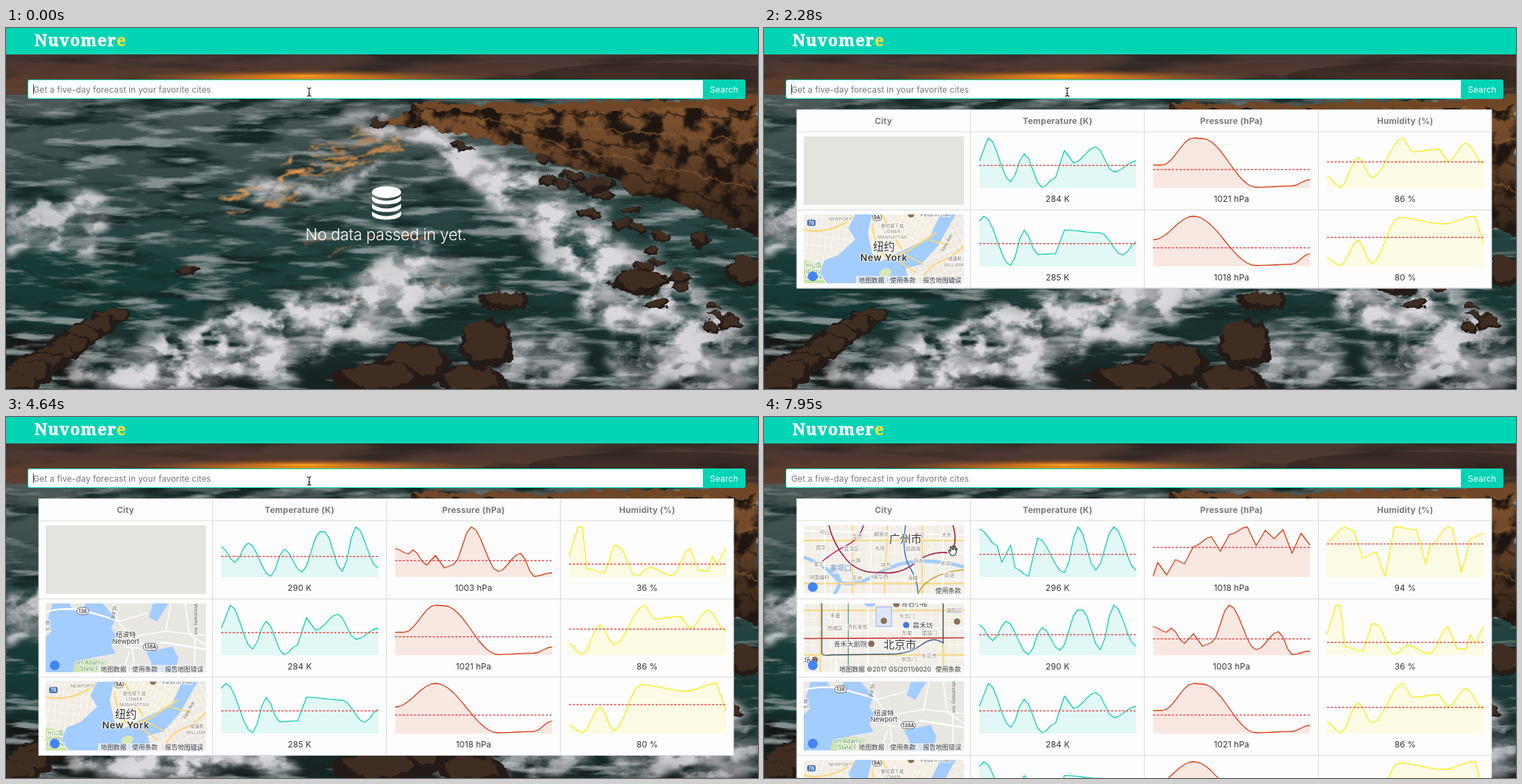
These frames come from a looping animation (1079x519 px, 8000 ms). An HTML page:

```html
<!DOCTYPE html>
<html lang="en">
<head>
<meta charset="utf-8">
<title>Five-day forecast</title>
<style>
  html, body { margin: 0; width: 100%; height: 100%; overflow: hidden; background: #263c3c; }
  svg { position: absolute; left: 0; top: 0; width: 1079px; height: 519px; }
  #photo { will-change: transform; }
  text { font-family: Inter, "Noto Sans CJK SC", "Noto Sans CJK", sans-serif; white-space: pre; }
  .mid { text-anchor: middle; }
</style>
</head>
<body>
<svg id="photo" viewBox="0 0 1079 519"></svg>
<svg id="ui" viewBox="0 0 1079 519"></svg>
<script>
const LOOP = 8000, ROW = 112.5, TOP = 149, TEAL = '#00d4b5';
const $ = id => document.getElementById(id);

let seed = 11;
const rnd = (a = 0, b = 1) => {
  seed = (seed * 16807) % 2147483647;
  return a + (b - a) * seed / 2147483647;
};
const mix = (a, b, p) => a + (b - a) * p;
const many = (n, fn) => Array.from({ length: n }, (_, i) => fn(i, i / (n - 1))).join('');
const poly = (pts, fill, extra = '') => `<polygon points="${pts}" fill="${fill}" ${extra}/>`;
const blob = (x, y, rx, ry, fill, o = 1, rot = 0) =>
  `<ellipse rx="${rx}" ry="${ry}" fill="${fill}" opacity="${o}" transform="translate(${x} ${y}) rotate(${rot})"/>`;
const line = (d, stroke, w = 1, extra = '') =>
  `<path d="${d}" fill="none" stroke="${stroke}" stroke-width="${w}" ${extra}/>`;
const label = (x, y, s, size, fill, extra = '') =>
  `<text x="${x}" y="${y}" font-size="${size}" fill="${fill}" class="mid" ${extra}>${s}</text>`;
const group = (filter, body) => `<g filter="url(#${filter})">${body}</g>`;

/* ---------- seaside backdrop ---------- */
const grad = (id, colors) => `<linearGradient id="${id}" x2="0" y2="1">${
  colors.map((c, i) => `<stop offset="${i / (colors.length - 1)}" stop-color="${c}"/>`).join('')}</linearGradient>`;
const area = 'x="0" y="0" width="1079" height="519" filterUnits="userSpaceOnUse" color-interpolation-filters="sRGB"';
const cloud = (freq, s) => `<feTurbulence type="fractalNoise" baseFrequency="${freq}" numOctaves="5" seed="${s}" result="n"/>`;
const rough = (id, freq, scale, blur) => `<filter id="${id}" ${area}>${cloud(freq, 3)}
  <feDisplacementMap in="SourceGraphic" in2="n" scale="${scale}" xChannelSelector="R" yChannelSelector="G"/>
  <feGaussianBlur stdDeviation="${blur}"/></filter>`;
const grain = (id, freq, s, gain, cut) => `<filter id="${id}" ${area}>${cloud(freq, s)}
  <feColorMatrix values="0 0 0 0 1  0 0 0 0 1  0 0 0 0 1  ${gain} 0 0 0 ${-cut}" result="m"/>
  <feComposite in="SourceGraphic" in2="m" operator="in"/></filter>`;

// irregular boulder with a lighter top
function rock(x, y, rx, ry) {
  const ring = (k, dy) => many(9, i => {
    const a = i / 9 * 2 * Math.PI, r = k * rnd(.85, 1.1);
    return `${x + rx * r * Math.cos(a)},${y + dy + ry * r * Math.sin(a)} `;
  });
  return poly(ring(1, 0), '#241b17') + poly(ring(.75, -ry * .2), '#3f2d22');
}

function photo() {
  const defs = grad('sky', ['#4a3833', '#4e3830', '#5f3e2c', '#5a4034'])
    + grad('sea', ['#4d5958', '#3c4e4c', '#2a4543', '#1d403c', '#193230', '#181f1f'])
    + grad('cliff', ['#86582f', '#6d472a', '#4a3220', '#2b2019'])
    + `<radialGradient id="glow"><stop stop-color="#ffb01c"/><stop offset=".4" stop-color="#d87a20" stop-opacity=".75"/><stop offset="1" stop-color="#a55a24" stop-opacity="0"/></radialGradient>`
    + rough('soft', '.02 .04', 30, 5) + rough('mist', '.014 .026', 70, 5) + rough('edge', '.045', 20, .7) + rough('streak', '.02 .08', 26, .8)
    + grain('clouds', '.006 .04', 4, 3, 1.3) + grain('lights', '.012 .07', 6, 4.5, 2.3) + grain('darks', '.01 .05', 9, 4, 1.9)
    + grain('foam', '.014 .03', 8, 2.6, .75) + grain('froth', '.025 .035', 2, 5, 2.1) + grain('cracks', '.035 .03', 5, 5, 2.2);

  const sky = '<rect y="38" width="1079" height="60" fill="url(#sky)"/>'
    + group('clouds', '<rect y="38" width="1079" height="56" fill="#2f2724"/>')
    + blob(430, 72, 260, 12, 'url(#glow)') + blob(430, 69, 130, 5, 'url(#glow)') + blob(950, 70, 200, 20, '#2a211f', .5);

  const water = fill => `<rect y="96" width="1079" height="423" fill="${fill}"/>`;
  const sea = water('url(#sea)')
    + group('soft', blob(100, 380, 190, 60, '#153a35', .7) + blob(700, 340, 70, 60, '#17332f', .8) + blob(30, 480, 90, 45, '#161614', .9))
    + group('darks', water('#152826')) + group('lights', water('#84908f'))
    + group('streak', many(60, (i, p) => blob(560 - 210 * p + rnd(-50, 40), 150 + 105 * p + rnd(-12, 10), rnd(8, 28), rnd(.8, 2),
      i % 3 ? '#c98650' : '#f0a457', .8, -12)) + many(12, () => blob(rnd(430, 620), rnd(300, 400), rnd(8, 25), 1.5, '#b8713f', .6, -15)));

  // breakers widen as they come closer
  const spray = fill => many(26, (i, p) => blob(600 - 400 * p + rnd(-25, 25), 370 + 130 * p + rnd(-20, 20), 70 + 55 * p, 28 + 16 * p, fill, .5, -14))
    + many(34, (i, p) => blob(520 + 480 * p + rnd(-45, 45) * p, 143 + 80 * p + 270 * p * p, 36 + 85 * p, 7 + 55 * p, fill, .42, 38))
    + blob(760, 480, 80, 45, fill, .6) + blob(50, 285, 100, 40, fill, .8, -6) + blob(440, 222, 95, 20, fill, .7, -6);
  const foam = group('foam', group('mist', spray('#a9a9ae'))) + group('froth', group('mist', spray('#dcdade')));

  const wall = '520,137 578,124 583,108 760,110 1079,99 1079,305 960,248 905,240 870,215 820,204 740,172 640,150';
  const cliff = group('edge', poly(wall, 'url(#cliff)'))
    + group('cracks', group('edge', poly(wall, '#1f1611') ))
    + group('edge', many(5, i => line(`M${600 + i * 40} ${118 + i * 9}Q820 ${128 + i * 17} 1079 ${128 + i * 34}`, i % 2 ? '#8a5c34' : '#20160f', 3, 'opacity=".55"'))
      + poly('583,108 760,110 1079,99 1079,113 840,119 600,116', '#6f4727'));

  const rocks = group('edge', many(22, (i, p) => rock(780 + 270 * p + rnd(-45, 45), 200 + 250 * p + rnd(-25, 25), 9 + 14 * rnd(), 4 + 6 * rnd()))
    + rock(535, 137, 17, 5) + rock(655, 170, 22, 6) + rock(845, 225, 36, 13) + rock(910, 366, 48, 18) + rock(995, 304, 13, 12)
    + rock(1065, 350, 34, 25) + rock(260, 348, 16, 7) + rock(715, 392, 42, 15)
    + rock(690, 456, 46, 38) + rock(585, 483, 55, 34) + rock(530, 505, 70, 28) + rock(670, 508, 55, 24)
    + many(8, (i, p) => rock(150 - 140 * p, 415 + 95 * p, 28 + 16 * p, 12 + 8 * p)));

  return `<defs>${defs}</defs>${sky}${sea}${foam}${cliff}${rocks}`;
}

/* ---------- maps, 230 x 99 each ---------- */
const streets = (id, base, rot, step) => `<pattern id="${id}" width="${step}" height="${step * 1.5}" patternUnits="userSpaceOnUse" patternTransform="rotate(${rot})">
  <rect width="${step}" height="${step * 1.5}" fill="${base}"/><path d="M0 0H${step}M0 0V${step * 1.5}" stroke="#fff" stroke-width="1.3"/></pattern>`;
const shield = (x, y, s, blue) => {
  const w = 6 + 3.6 * s.length;
  return `<rect x="${x - w / 2}" y="${y - 5}" width="${w}" height="10" rx="${blue ? 3 : 5}" fill="${blue ? '#4470b8' : '#fff'}" stroke="${blue ? '#fff' : '#555'}" stroke-width=".9"/>`
    + label(x, y + 2.6, s, 7, blue ? '#fff' : '#333', 'font-weight="600"');
};
const halo = 'stroke="#fff" stroke-width="2" paint-order="stroke" stroke-linejoin="round"';
const BROWN = '#8b7d6b', GREY = '#666';
const ground = fill => `<rect width="230" height="99" fill="${fill}"/>`;
const stack = (x, y, step, list, fill, size) => list.split(' ').map((s, i) => label(x, y + i * step, s, size, fill, halo)).join('');
// district names on a loose grid
const districts = (list, cols) => list.split(' ').map((s, i) =>
  label(26 + (i % cols) * 180 / (cols - 1) + rnd(-7, 7), 16 + Math.floor(i / cols) * 20 + rnd(-4, 4), s, 7.3, BROWN, halo)).join('');
const pin = (x, y, fill = '#8a6e5b') => blob(x, y, 4.6, 4.6, fill);

const maps = {
  newYork: () => ground('#a3ccff')
    + poly('0,0 74,0 64,20 74,36 50,58 30,66 22,84 34,99 0,99', 'url(#stA)')
    + poly('0,66 22,70 16,80 32,99 0,99', '#cbe6a3')
    + poly('98,0 92,26 98,56 110,68 142,52 180,34 196,0', 'url(#stB)')
    + poly('218,0 192,46 168,72 146,78 152,99 230,99 230,0', 'url(#stC)')
    + blob(117, 84, 9, 6, '#d5e8b4', 1, -20)
    + line('M0 22Q36 30 72 4M98 14Q104 54 122 64L150 52 190 26M168 99Q176 76 196 68T230 44M112 0L140 50', '#f9d978', 2.2)
    + line('M128 62L162 84M140 55L172 72M176 36L208 44', '#f9d978', 1.8)
    + stack(127, 19, 8.2, '曼哈顿下城 LOWER MANHATTAN', BROWN, 6.6) + stack(52, 8.5, 0, 'NEWPORT', BROWN, 6.6)
    + stack(217, 66, 9, '威廉斯 WILLIAMS', BROWN, 6.6) + stack(14, 76, 8.5, '州公園 iberty te&#160;Park', '#5f9a4c', 7.5)
    + label(189, 3, 'Pelbrin Hall', 8, GREY, halo) + pin(154, 0)
    + label(207, 42, 'Fenn Ave', 6, GREY, 'transform="rotate(-62 207 42)"')
    + shield(11, 12, '78', 1) + shield(105, 4, '9A') + shield(213, 97, '278', 1)
    + label(115, 52, '纽约', 15.5, '#333', halo)
    + label(115, 67, 'New York', 13.5, '#333', halo + ' font-weight="600" letter-spacing=".7"'),

  newport: () => ground('#a3ccff')
    + poly('0,0 10,0 2,26 8,40 0,48', '#e9e7e2') + poly('34,0 58,0 52,11 38,8', '#e9e7e2')
    + poly('82,0 100,22 94,36 102,48 94,60 100,72 66,78 38,99 146,99 152,86 144,70 182,62 190,78 186,99 230,99 230,0 176,0 160,26 148,20 154,0', '#e9e7e2')
    + poly('42,84 62,79 88,82 84,99 38,99', '#cde4ae')
    + line('M96 0L104 26 122 48 128 99M104 26L146 14M122 48L172 40 230 46M112 62L150 66M200 0L206 44 230 60M172 40L180 0M214 0V99M110 99L120 70', '#fff', 1.6)
    + line('M0 12Q30 4 60 12T106 26M122 48Q138 66 168 56L230 66', '#fff', 2.4)
    + shield(53, 11, '138') + shield(150, 62.5, '138A')
    + label(100, 14, '3rd St', 7, GREY, 'transform="rotate(-80 100 14)"')
    + label(213, 22, 'Meadowby Ave', 6.4, GREY, 'transform="rotate(90 213 22)"')
    + stack(3, 30, 8.5, '敦 wn', GREY, 7) + stack(63, 88, 9, 'ort&#160;Adams State&#160;P', '#4f8f45', 8.4)
    + stack(115, 48, 9.5, '纽波特 Newport', '#333', 9.6),

  beijing: () => ground('url(#stD)')
    + line('M24 0V99M200 0V99M0 10H230M0 74H230', '#f8d98a', 2.6) + line('M0 36H230M92 0V99M150 0V99M46 0V99', '#fff', 2)
    + '<rect x="104" y="5" width="22" height="28" fill="#dfe5fb" stroke="#8fb0ee"/>' + blob(95, 1, 8, 4, '#a3ccff')
    + line('M0 50.5L230 49.5', '#c8342f', 1.6) + line('M64 0V99', '#3f8c8c', 1.2)
    + line('M26 0V72Q28 76 40 74L120 73Q150 74 168 60T200 57V0', '#35588f', 1.4)
    + stack(45, 20, 18, '丰盛 西城区', BROWN, 7.4) + stack(77, 36, 0, '西长安街', BROWN, 7.4) + stack(148, 21, 24, '东华门 东单', BROWN, 7.4)
    + stack(216, 13, 0, '朝阳区', BROWN, 7.4) + stack(180, 45, 33, '建国门 东花市', BROWN, 7.4) + stack(151, 83, 0, '崇文门', BROWN, 7.4)
    + label(67, 61.5, '青禾大剧院', 9.6, '#444', halo) + label(171, 34.5, '晨禾坊', 9.6, '#444', halo)
    + label(159, 4, '青石小楼', 9.6, '#444', halo) + label(5, 85, '场', 9.6, '#444', halo)
    + pin(97, 58) + pin(115, 25) + pin(147, 31, '#4b78d8') + pin(133, 1) + pin(16, 81) + pin(220, 26)
    + label(138, 65, '北京市', 15.6, '#333', halo),

  guangzhou: () => ground('url(#stD)')
    + line('M0 46Q30 56 46 76T110 68T230 60M44 99Q58 80 46 70', '#a3ccff', 5)
    + line('M0 22H230M70 0V99M170 0V99M120 0L116 99M0 84H230', '#f8d98a', 2.3) + line('M0 8L230 14M30 0V99M200 0V99M96 0V99', '#fff', 1.8)
    + line('M22 56Q40 40 60 30T86 0', '#bd2f7c', 1.7) + line('M36 0Q42 26 60 48T110 68Q138 72 160 54T210 40Q222 26 214 0', '#a32f56', 1.8)
    + line('M146 0Q140 40 152 60T164 99', '#4d6fd0', 1.6) + line('M164 99Q176 70 230 64', '#c9a42c', 1.6)
    + districts('中山 华贵 解放北 建设 大东 昌华 荔湾区 光塔 德政南 农林 宝华 光荫 诗书 跃龙 赤岗 冲围塘村 花地 南华西 海幢 前进', 5)
    + label(53, 65, '塞坝口', 10.5, '#5f92cf') + label(146, 25.5, '广州市', 15.6, '#333', halo)
};

const terms = (x, s) => `<text x="${x}" y="97.6" font-size="9.2" fill="#444">${s}</text>`;
const strip = x => `<rect x="${x}" y="88.5" width="${230 - x}" height="10.5" fill="#f5f5f5" opacity=".75"/>`;
const footers = {
  full: strip(75) + terms(79, '地图数据') + terms(124, '使用条款') + terms(171, '报告地图错误') + line('M120 90V98M167 90V98', '#bbb', .7),
  dated: strip(48) + terms(51, '地图数据 ©2017 GS(2011)6020') + terms(189, '使用条款'),
  short: strip(185) + terms(189, '使用条款')
};

/* ---------- forecasts: turning points as step, depth pairs ---------- */
const cities = [
  { map: 'newYork', foot: 'full', row: 230, tiles: 230, badge: 470, terms: 470, text: ['285 K', '1018 hPa', '80 %'], turns: [
    [0, 7, 1, 0, 7, 71, 10, 20, 13, 55, 17, 54, 19, 20, 27, 24, 32, 56, 35, 37],
    [0, 34, 9, 0, 23, 71, 31, 69, 35, 54],
    [0, 60, 3, 71, 7, 34, 10, 68, 16, 2, 26, 11, 33, 0, 35, 39]] },
  { map: 'newport', foot: 'full', row: 2170, tiles: 2670, badge: 2820, terms: 2820, text: ['284 K', '1021 hPa', '86 %'], turns: [
    [0, 33, 2, 0, 7, 63, 10, 23, 14, 71, 17, 57, 19, 18, 21, 36, 26, 13, 30, 49, 35, 33],
    [0, 39, 2, 39, 9, 0, 11, 1, 23, 71, 31, 69, 35, 60],
    [0, 55, 3, 71, 7, 28, 10, 57, 17, 0, 19, 20, 25, 16, 27, 34, 31, 7, 35, 37]] },
  { map: 'beijing', foot: 'dated', row: 4640, tiles: 5780, badge: 6200, terms: 6200, text: ['290 K', '1003 hPa', '36 %'], turns: [
    [0, 28, 3, 51, 6, 23, 11, 71, 14, 32, 18, 65, 22, 7, 23, 7, 27, 64, 30, 0, 35, 59],
    [0, 31, 3, 39, 4, 33, 7, 55, 9, 41, 11, 59, 13, 54, 17, 0, 23, 64, 28, 38, 31, 71, 35, 66],
    [0, 42, 2, 0, 3, 1, 4, 60, 8, 66, 10, 27, 11, 27, 15, 71, 18, 58, 23, 70, 27, 31, 29, 62, 31, 64, 32, 42, 33, 55, 35, 30]] },
  { map: 'guangzhou', foot: 'short', row: 7050, tiles: 7170, badge: 7170, terms: 7340, text: ['296 K', '1018 hPa', '94 %'], turns: [
    [0, 3, 4, 27, 5, 51, 7, 26, 8, 59, 11, 71, 13, 16, 19, 66, 22, 0, 26, 62, 30, 0, 35, 62],
    [0, 71, 1, 51, 3, 69, 5, 47, 7, 53, 9, 28, 13, 14, 15, 35, 17, 11, 21, 0, 23, 27, 25, 5, 27, 17, 29, 4, 31, 38, 33, 9, 35, 26],
    [0, 21, 4, 0, 6, 6, 8, 45, 11, 36, 13, 71, 15, 0, 20, 4, 22, 53, 23, 27, 27, 0, 28, 2, 30, 65, 32, 17, 35, 9]] }
];

function curve(turns) {
  return Array.from({ length: 36 }, (_, i) => {
    let k = 0;
    while (turns[k + 2] < i) k += 2;
    const [a, from, b, to] = turns.slice(k, k + 4);
    return mix(from, to, (1 - Math.cos(Math.PI * (i - a) / (b - a))) / 2);
  });
}

const COLS = [171.5, 421.3, 670.8, 920], INK = ['#0fcdb2', '#d9360b', '#ffe812'];
function chart(turns, k) {
  const x = 309 + k * 249.4, ys = curve(turns), color = INK[k];
  const mean = ys.reduce((a, b) => a + b) / ys.length;
  const pts = ys.map((y, i) => `${(x + i * 225 / 35).toFixed(1)} ${(9 + y).toFixed(1)}`).join('L');
  return `<path d="M${x} 81L${pts}L${x + 225} 81Z" fill="${color}" opacity=".11"/>`
    + line('M' + pts, color, 1.3, 'stroke-linejoin="round"')
    + line(`M${x} ${Math.round(mean + 12) + .5}h225`, '#f23a3a', 1.3, 'stroke-dasharray="3 2.4"');
}
const cityRow = (c, i) => `<g id="row${i}">
  <rect x="47" width="997" height="${ROW}" fill="#fdfdfd"/>
  ${line(`M47 ${ROW}H1044M296.5 0V${ROW}M546 0V${ROW}M795.5 0V${ROW}`, '#d9d9d9')}
  <g transform="translate(57 6.5)" clip-path="url(#mapClip)">${ground('#e5e3df')}
    <g id="tiles${i}">${maps[c.map]()}</g><g id="terms${i}">${footers[c.foot]}</g>
    <circle id="badge${i}" cx="13" cy="89" r="7" fill="#4285f4"/></g>
  ${c.turns.map(chart).join('')}
  ${c.text.map((s, k) => label(COLS[k + 1], 101, s, 12.1, '#363636', 'letter-spacing=".09"')).join('')}</g>`;

const disk = y => `<path d="M525 ${y}Q546 ${y + 13} 567 ${y}V${y + 4}C567 ${y + 14} 525 ${y + 14} 525 ${y + 4}Z" fill="#fff"/>`;

$('photo').innerHTML = photo();
$('ui').innerHTML = `<defs>${streets('stA', '#f1ede4', 8, 9)}${streets('stB', '#f3eee0', 28, 7)}${streets('stC', '#eeeae2', -24, 8)}${streets('stD', '#f2efe7', 0, 13)}
  <clipPath id="mapClip"><rect width="230" height="99"/></clipPath></defs>
  <rect width="1079" height="38" fill="${TEAL}"/>
  <text x="41" y="26" font-size="23" fill="#fff" stroke="#fff" stroke-width=".6" style="font-family:'Noto Serif',serif;font-weight:700;letter-spacing:1.2px">Nuvomer<tspan fill="#f6e13d" stroke="#f6e13d">e</tspan></text>
  <g id="empty"><ellipse cx="546" cy="236" rx="21" ry="8.5" fill="#fff"/>${disk(242)}${disk(253)}${disk(264)}
    ${label(545, 305, 'No data passed in yet.', 23, '#fff', 'font-weight="300" letter-spacing="-.35"')}</g>
  <g id="table">${cities.map(cityRow).join('')}
    <rect x="47" y="117" width="997" height="32" fill="#fdfdfd"/>
    ${line('M47 149H1044M296.5 117V149M546 117V149M795.5 117V149', '#d9d9d9')}
    ${['City', 'Temperature (K)', 'Pressure (hPa)', 'Humidity (%)'].map((s, k) => label(COLS[k], 138, s, 12.1, '#7a7a7a', 'font-weight="700" letter-spacing=".22"')).join('')}
    <rect id="frame" x="47" y="117.5" width="997" fill="none" stroke="#d9d9d9"/></g>
  <rect x="31" y="74" width="1030" height="28" rx="3" fill="${TEAL}"/>
  <path d="M1000 75H34Q32 75 32 77V99Q32 101 34 101H1000Z" fill="#fff"/>
  ${label(1030.3, 92.6, 'Search', 12.1, '#fff', 'letter-spacing=".09"')}
  <text id="field" x="39" y="92.6" font-size="12.1" letter-spacing=".09"></text>
  <rect id="caret" y="81" width="1" height="14" fill="#333"/>
  <g id="beam">${line('M-3 -6Q0 -6 0 -4Q0 -6 3 -6M0 -4V5M-3 6Q0 6 0 4Q0 6 3 6M-1.5 2H1.5', '#111', 1.1)}</g>
  <path id="arrow" d="M0 0V13L3 10L5 15L7 14L5 9.5H9Z" fill="#111" stroke="#fff" stroke-width=".9"/>
  <path id="hand" d="M-3 7L-6 1Q-6 -1 -4 0L-3 1.5L-4 -5Q-3 -7 -2 -5L-1 -1V-6Q0 -8 1 -6V-1L2.5 -6Q4 -7 4 -5L3.5 0L5 -3Q6.5 -4 6 -2L4.5 4L3 7Z" fill="#fff" stroke="#111"/>`;

/* ---------- timeline ---------- */
const KEY = 117;
const burst = (start, n) => Array.from({ length: n }, (_, i) => start + i * KEY);
const typing = [
  { word: 'Newport', keys: [...burst(680, 3), 1400, ...burst(1630, 2), 1930], end: 2050 },
  { word: 'Beijing', keys: burst(3590, 7), end: 4530 },
  { word: 'Guangzhou', keys: [...burst(5660, 4), ...burst(6200, 2), ...burst(6460, 3)], end: 6930 }
];
const caretOff = [[3440, 3590], [5270, 5660], [7720, LOOP]];
const pointer = [[0, 435, 92], [7170, 400, 112], [7340, 300, 152], [7460, 205, 198], [7580, 168, 216], [7720, 215, 214], [7840, 255, 205], [7950, 271, 192]];
const show = (id, on) => $(id).setAttribute('visibility', on ? 'inherit' : 'hidden');

function render(t) {
  const active = typing.find(w => t >= w.keys[0] && t < w.end);
  const typed = active ? active.word.slice(0, active.keys.filter(k => k <= t).length) : '';
  const field = $('field');
  field.textContent = typed || 'Get a five-day forecast in your favorite cites';
  field.setAttribute('fill', typed ? '#363636' : '#777');
  $('caret').setAttribute('x', 39 + (typed ? field.getComputedTextLength() : 0));
  show('caret', !caretOff.some(([a, b]) => t >= a && t < b));

  const shown = cities.filter(c => t >= c.row).length;
  show('empty', !shown);
  show('table', shown);
  $('frame').setAttribute('height', TOP - 117.5 + shown * ROW);
  cities.forEach((c, i) => {
    show('row' + i, shown && i < shown);
    $('row' + i).setAttribute('transform', `translate(0 ${TOP + (shown - 1 - i) * ROW})`);
    for (const part of ['tiles', 'badge', 'terms']) show(part + i, t >= c[part]);
  });

  const [, x, y] = pointer.filter(p => p[0] <= t).pop();
  const kind = y < 102 ? 'beam' : x < 287 && y > 155 ? 'hand' : 'arrow';
  for (const id of ['beam', 'hand', 'arrow']) show(id, id === kind);
  $(kind).setAttribute('transform', `translate(${x} ${y})`);
}

const cuts = [...new Set([0, ...typing.flatMap(w => [...w.keys, w.end]), ...caretOff.flat(),
  ...cities.flatMap(c => [c.row, c.tiles, c.badge, c.terms]), ...pointer.map(p => p[0])])].sort((a, b) => a - b);
const start = performance.now();
let last = -1;
function tick() {
  const t = (performance.now() - start) % LOOP;
  const cut = cuts.filter(c => c <= t).pop();
  if (cut !== last) render(last = cut);
  requestAnimationFrame(tick);
}
tick();
</script>
</body>
</html>
```
